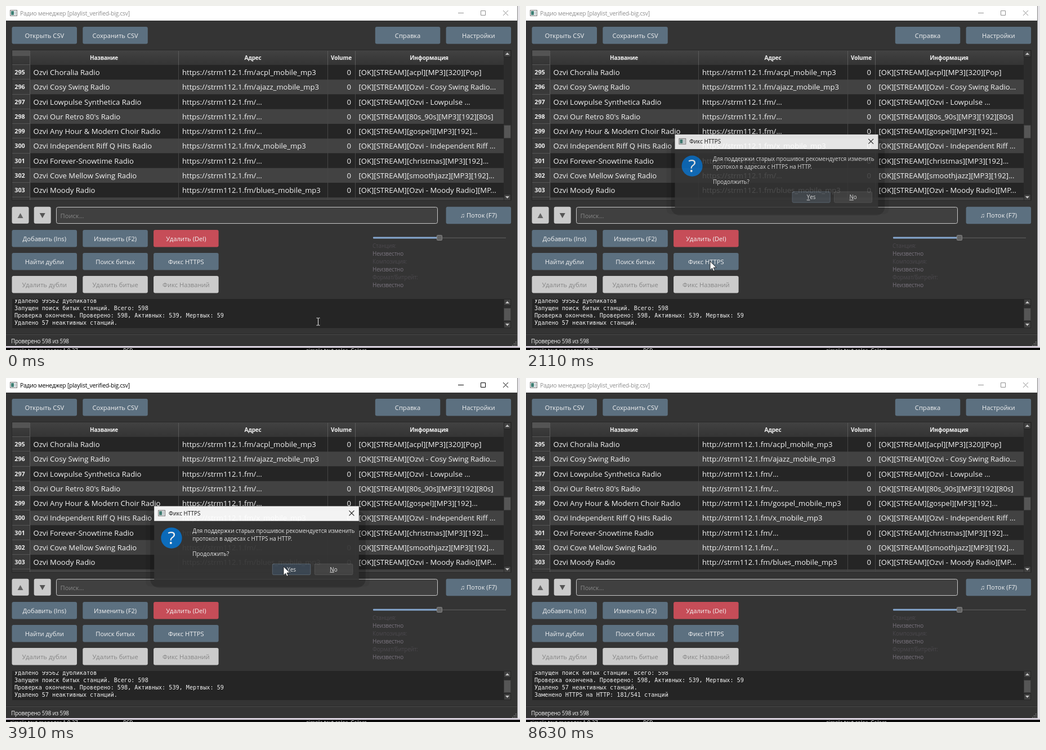
These frames come from a looping animation (913x613 px, 9.03 s). An HTML page:

```html
<!DOCTYPE html>
<html lang="ru">
<head>
<meta charset="utf-8">
<style>
html, body { margin: 0; width: 100%; height: 100%; overflow: hidden; background: #343434; }
svg { display: block; }
text { font-family: "Open Sans", "Noto Sans", sans-serif; white-space: pre; }
.cell { font-size: 13.1px; fill: #f4f4f4; }
.btn { font-size: 11.2px; fill: #f2f2f2; text-anchor: middle; }
.off { fill: #858585; }
.small { font-size: 9.9px; letter-spacing: -.15px; fill: #f2f2f2; }
.msg { font-size: 10px; fill: #f2f2f2; }
.title { font-size: 10.3px; letter-spacing: -.2px; }
.head { font-size: 10px; letter-spacing: -.15px; font-weight: 700; fill: #f2f2f2; text-anchor: middle; }
.num { font-size: 10.8px; font-weight: 700; fill: #eee; text-anchor: middle; }
.log { font-family: "DejaVu Sans Mono", monospace; font-size: 10.15px; fill: #f2f2f2; }
</style>
</head>
<body>
<svg id="stage" width="913" height="613" viewBox="0 0 913 613" xmlns="http://www.w3.org/2000/svg"></svg>
<script>
const LOOP = 9030;
const BLUE = '#5c7080', HOVER = '#48596a', RED = '#c64d58', OFF = '#cbcbcb';

const rect = (x, y, w, h, fill, more = '') =>
  `<rect x="${x}" y="${y}" width="${w}" height="${h}" fill="${fill}" ${more}/>`;
const text = (x, y, str, cls, more = '') =>
  `<text x="${x}" y="${y}" class="${cls}" ${more}>${str}</text>`;
const path = (d, fill, more = '') => `<path d="${d}" fill="${fill}" ${more}/>`;
const line = (d, color, more = '') => path(d, 'none', `stroke="${color}" ${more}`);
const button = (x, y, label, fill = BLUE, id = '') =>
  rect(x, y, 115.5, 30.5, fill, `rx="3" ${id}`) +
  text(x + 57.8, y + 19.5, label, fill === OFF ? 'btn off' : 'btn');
const appIcon = (x, y) =>
  rect(x + .5, y + .5, 12, 10, '#f4f4f4', 'stroke="#777"') +
  rect(x + 2, y + 2, 5, 7, '#3f7f74') + rect(x + 8, y + 2, 3, 7, '#c9d2d6');
const cross = (x, y) => `M${x - 4.5} ${y - 4.5}l9 9m0-9l-9 9`;

const ROW = 26.25, TOP = 105;
const rows = [
  ['Choralia Radio', 'acpl_mobile_mp3', '[acpl][MP3][320][Pop]'],
  ['Cosy Swing Radio', 'ajazz_mobile_mp3', '[Ozvi - Cosy Swing Radio...'],
  ['Lowpulse Synthetica Radio', '...', '[Ozvi - Lowpulse ...'],
  ["Our Retro 80's Radio", '...', '[80s_90s][MP3][192][80s]'],
  ['Any Hour &amp; Modern Choir Radio', '...', '[gospel][MP3][192]...', 'gospel_mobile_mp3'],
  ['Independent Riff Q Hits Radio', 'x_mobile_mp3', '[Ozvi - Independent Riff ...'],
  ['Forever-Snowtime Radio', '...', '[christmas][MP3][192]...'],
  ['Cove Mellow Swing Radio', '...', '[smoothjazz][MP3][192]...'],
  ['Moody Radio', 'blues_mobile_mp3', '[Ozvi - Moody Radio][MP...']
];
const logLines = [
  'Удалено 99562 дубликатов',
  'Запущен поиск битых станций. Всего: 598',
  'Проверка окончена. Проверено: 598, Активных: 539, Мертвых: 59',
  'Удалено 57 неактивных станций.',
  'Заменено HTTPS на HTTP: 181/541 станций'
];

function scrollbar(y0, y1, h0, h1, id) {
  const tri = (y, s) => path(`M887 ${y + 2 * s}h7l-3.5 ${-4 * s}z`, '#c8c8c8');
  return rect(884, y0, 13, y1 - y0, '#2c2c2c') +
    rect(884.5, y0 + .5, 12, 11, '#414141', 'stroke="#262626"') + tri(y0 + 6, 1) +
    rect(884.5, y1 - 11.5, 12, 11, '#414141', 'stroke="#262626"') + tri(y1 - 6, -1) +
    rect(884.5, h0, 12, h1 - h0, '#565656', `stroke="#3a3a3a" id="${id}"`);
}

function table() {
  let s = rect(11, 79, 886, 268, '#2a2a2a') + rect(11, 79, 873, 26, 'url(#hd)');
  s += rect(11, 79, 31, 10, '#545454', 'id="corner"');
  for (let i = 0; i < 10; i++) {
    const y = TOP + i * ROW, h = Math.min(ROW, 346 - y);
    s += rect(42, y, 842, h, i % 2 ? '#424242' : '#252525') + rect(11, y, 31, h, '#393939');
  }
  s += line('M42.5 105V346M306.5 105V346M571.5 105V346M620.5 105V346', '#464646');
  s += '<g id="seps">' + line('M42.5 80V346M306.5 80V105M571.5 80V105M620.5 80V105', '#5a5a5a');
  for (let i = 0; i < 10; i++) s += line(`M11 ${Math.round(TOP + i * ROW) - .5}h31`, '#565656');
  s += '</g>';
  [[174, 'Название'], [438.5, 'Адрес'], [595.5, 'Volume'], [751.5, 'Информация']]
    .forEach(([x, label]) => s += text(x, 96, label, 'head'));
  rows.forEach(([name, , info], i) => {
    const y = TOP + i * ROW + 18;
    s += text(24.5, y - 1, 295 + i, 'num') + text(48.5, y, 'Ozvi ' + name, 'cell') +
      text(313, y, '', 'cell', `id="url${i}"`) +
      text(613, y, '0', 'cell', 'text-anchor="end"') +
      text(626.5, y, '[OK][STREAM]' + info, 'cell');
  });
  return s + scrollbar(79, 347, 212.5, 235.5, 'thumb') +
    line('M10.5 78.5H897.5V346.5H10.5z', '#282828');
}

function controls() {
  let s = button(10.5, 37, 'Открыть CSV') + button(136.3, 37, 'Сохранить CSV') +
    button(655.8, 37, 'Справка') + button(781.6, 37, 'Настройки') +
    button(781.6, 357.7, '♫ Поток (F7)');
  [['Добавить (Ins)', 'Изменить (F2)', 'Удалить (Del)'],
   ['Найти дубли', 'Поиск битых', 'Фикс HTTPS'],
   ['Удалить дубли', 'Удалить битые', 'Фикс Названий']].forEach((group, r) =>
    group.forEach((label, c) => {
      const fill = r === 2 ? OFF : r === 0 && c === 2 ? RED : BLUE;
      s += button(10.5 + c * 125.8, 399 + r * 41, label, fill, r === 1 && c === 2 ? 'id="fix"' : '');
    }));
  s += rect(10.5, 357.7, 30, 30, OFF, 'rx="3"') + path('M20.5 378h10l-5-9z', '#666') +
    rect(49.7, 357.7, 30, 30, OFF, 'rx="3"') + path('M59.7 369h10l-5 9z', '#555') +
    rect(89.5, 358.5, 677, 29, '#404040', 'rx="3" stroke="#c8c8c8"') +
    text(96.5, 377.5, 'Поиск...', 'btn off', 'style="text-anchor:start"');
  s += rect(775, 412.5, 113, 1.5, '#555') + rect(652, 411.5, 114, 3, '#86a8d0', 'rx="1"') +
    rect(765.5, 408.5, 9, 9, '#626262', 'rx="1" stroke="#858585"');
  ['Станция:', 'Композиция:', 'Формат/Битрейт:'].forEach((label, i) => {
    s += text(651, 431 + i * 28, label, 'small', 'style="fill:#4b484d"') +
      text(651, 445 + i * 28, 'Неизвестно', 'small', 'style="fill:#79737d"');
  });
  return s;
}

function logPanel() {
  let s = rect(11, 522, 886, 52, '#252525') + '<g clip-path="url(#logClip)"><g id="log">';
  logLines.forEach((str, i) => s += text(15, 528.5 + i * 13, str, 'log'));
  return s + '</g></g>' + scrollbar(522, 574, 538.5, 560.5, 'logThumb');
}

function frame() {
  let s = rect(0, 0, 908, 26, '#fff') + appIcon(7, 7) +
    text(25, 16.5, 'Радио менеджер [playlist_verified-big.csv]', 'title', 'id="title"') +
    line('M803 12.5h10M843.5 8.5h8v8h-8z' + cross(887.5, 12.5), '#000', 'id="winBtns"');
  s += line('M0 585.5H908', '#4a4a4a') + line('M0 584.5H908', '#2a2a2a') +
    text(9, 601, 'Проверено 598 из 598', 'small', 'style="letter-spacing:-.2px"');
  for (let i = 0; i < 3; i++)
    for (let j = 0; j <= i; j++) s += rect(905 - j * 3, 598 + i * 3, 1.5, 1.5, '#888');
  return s + rect(908, 0, 5, 613, '#e6e4e8') + rect(908, 0, 1, 608, '#8a8a8a') +
    rect(0, 606, 913, 3, '#ddd6e2') + rect(0, 609, 913, 4, '#0a0a0a') +
    text(7, 618, 'simple text manager 1.0.27', 'small') + text(208, 618, 'RSR', 'small') +
    text(533, 618, 'simple text color', 'small') + text(612, 618, 'Colors', 'small');
}

function dialog() {
  const key = (x, id, label, fill, edge) =>
    rect(x + .5, 331.5, 68, 19.5, fill, `rx="2" stroke="${edge}" id="${id}"`) +
    text(x + 34.5, 345, `<tspan text-decoration="underline">${label[0]}</tspan>${label.slice(1)}`,
      'msg', 'text-anchor="middle"');
  return rect(247, 233, 400, 139, '#000', 'rx="8" opacity=".07"') +
    rect(255, 237, 385, 137, '#000', 'rx="15" opacity=".2"') +
    rect(262, 228, 366, 132, '#343434') + rect(262, 228, 366, 26.5, '#fff') +
    appIcon(269, 235) +
    text(288, 244.5, 'Фикс HTTPS', 'msg', 'style="fill:#111"') +
    line(cross(615, 240.5), '#222', 'stroke-width="1.2"') +
    '<circle cx="293" cy="285" r="18.8" fill="#0a6fc4"/>' +
    text(293, 296.5, '?', 'btn', 'style="font-size:32px;font-weight:500;fill:#fff"') +
    text(330.5, 275.5, 'Для поддержки старых прошивок рекомендуется изменить', 'msg') +
    text(330.5, 289.5, 'протокол в адресах с HTTPS на HTTP.', 'msg') +
    text(330.5, 317.5, 'Продолжить?', 'msg') +
    key(473, 'yes', 'Yes', '#464c52', '#5c6873') + key(548.5, 'no', 'No', '#454545', '#555');
}

const stage = document.getElementById('stage');
stage.innerHTML =
  `<defs><linearGradient id="hd" x2="0" y2="1"><stop stop-color="#424242"/><stop offset="1" stop-color="#343434"/></linearGradient>
  <clipPath id="logClip"><rect x="11" y="523" width="873" height="49"/></clipPath></defs>` +
  rect(0, 0, 913, 613, '#343434') + table() + controls() + logPanel() + frame() +
  `<g id="dialog">${dialog()}</g>
  <circle id="ring" r="8.5" fill="none" stroke="#fff" stroke-opacity=".75"/>
  <g id="arrow">${path('M0 0V15.5l3.6-3.4 2.3 5.2 2.4-1-2.3-5.2H11z', '#fff', 'stroke="#111" stroke-width=".8"')}</g>
  <g id="beam">${line('M-3-6.5h2.5l.5.5.5-.5H3M-3 6.5h2.5L0 6l.5.5H3M0-6V6', '#eee')}</g>`;

const el = {};
stage.querySelectorAll('[id]').forEach(n => el[n.id] = n);
const set = (id, name, value) => el[id].setAttribute(name, value);
const show = (id, on) => set(id, 'visibility', on ? 'visible' : 'hidden');
const clamp = v => Math.max(0, Math.min(1, v));
const smooth = u => u * u * (3 - 2 * u);
const drift = u => Math.pow(u, 1.15);

// start, end, x, y, easing
const moves = [
  [620, 1360, 327, 455, smooth],
  [2300, 3000, 482, 338, smooth],
  [3210, 3270, 484, 337, smooth],
  [3300, 3330, 489, 335, smooth],
  [3360, 3390, 493, 336, smooth],
  [7030, 7050, 502, 369, smooth],
  [7090, 7760, 800, 616, drift]
];
function pointer(t) {
  let x = 554.5, y = 562.5;
  for (const [a, b, px, py, ease] of moves) {
    if (t < a) break;
    const k = ease(clamp((t - a) / (b - a)));
    x += (px - x) * k;
    y += (py - y) * k;
  }
  return [x, y];
}

let wasFixed = null;
function setFixed(fixed) {
  if (fixed === wasFixed) return;
  wasFixed = fixed;
  rows.forEach(([, tail, , full], i) =>
    el['url' + i].textContent = `http${fixed ? '' : 's'}://strm112.1.fm/${fixed && full || tail}`);
  set('log', 'transform', `translate(0 ${fixed ? -13 : 0})`);
}

function render(t) {
  const active = t >= 1540 && t < 1960 || t >= 3910 && t < 8630;
  set('title', 'fill', active ? '#000' : '#8f8f8f');
  set('winBtns', 'stroke', active ? '#000' : '#8f8f8f');
  setFixed(t >= 4000);

  const flat = t >= 4000 && t < 8630;
  show('seps', !flat);
  show('corner', !flat);
  set('thumb', 'fill', flat ? '#404040' : '#565656');
  set('thumb', 'stroke', flat ? '#5a5a5a' : '#3a3a3a');

  const opening = 1 - Math.pow(1 - clamp((t - 1990) / 250), 3);
  const shown = opening * (1 - clamp((t - 3900) / 170));
  const scale = .9 + .1 * shown;
  show('dialog', shown > 0);
  set('dialog', 'opacity', shown);
  set('dialog', 'transform', `translate(445 294) scale(${scale}) translate(-445 -294)`);

  const [x, y] = pointer(t);
  const overFix = x >= 262 && x <= 378 && y >= 440 && y <= 470;
  set('fix', 'fill', overFix && t < 1960 ? HOVER : BLUE);
  const overYes = x >= 473 && x <= 542 && y >= 331 && y <= 351;
  set('yes', 'fill', t >= 3730 ? '#3c4854' : overYes ? '#586775' : '#464c52');

  show('ring', t >= 1540 && t < 1930 || t >= 3730 && t < 3910);
  set('ring', 'cx', x);
  set('ring', 'cy', y);
  const inField = y >= 358 && y <= 388 && x >= 89 && x <= 767 && t > 7000;
  const inLog = y >= 522 && y <= 574 && x < 884;
  const beam = inField || inLog, here = t < 7760;
  show('beam', here && beam);
  show('arrow', here && !beam);
  set('beam', 'transform', `translate(${x} ${y})`);
  set('arrow', 'transform', `translate(${x} ${y})`);
}

const begin = performance.now();
function tick() {
  render((performance.now() - begin) % LOOP);
  requestAnimationFrame(tick);
}
tick();
</script>
</body>
</html>
```
